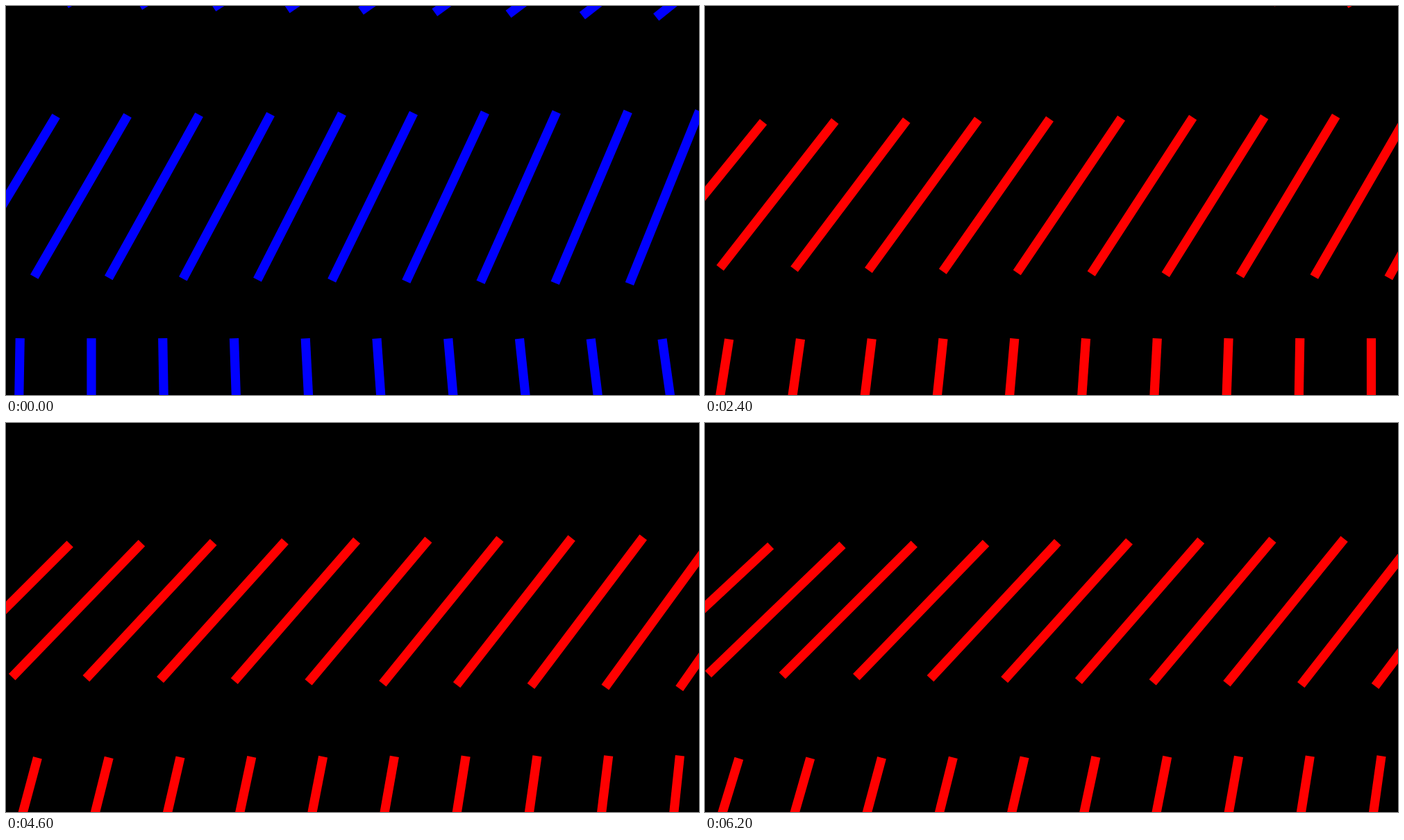
An HTML page that plays this animation: 998x561 px, repeating every 6300 ms.

```html
<!DOCTYPE html>
<html lang="en">
<head>
<meta charset="utf-8">
<title>Turning bars</title>
<style>
  html, body { margin: 0; width: 100%; height: 100%; overflow: hidden; background: #000; }
  svg { display: block; width: 100vw; height: 100vh; }
</style>
</head>
<body>
<svg id="stage" viewBox="0 0 998 561" preserveAspectRatio="none"></svg>
<script>
  const LOOP = 6300, STEP = 100;
  const BLUE = '#0000ff', RED = '#ff0000';
  const PITCH = 104.57, LEFT = 18.4;      // column pivots
  const ROW_PITCH = 335.4, TOP = -87.3;   // row pivots
  const ABOVE = 104.3, BELOW = 164.5, WIDTH = 13.2;
  const ROW_TURN = 30;                    // degrees between rows, 1 between columns

  const pauses = [30, 35, 40, 41];        // ticks on which nothing moves
  const turns = [[0, 59], [14, 152], [24, 231], [31, 291], [42, 405], [48, 480], [58, 583]];

  const bars = [];
  const stage = document.getElementById('stage');
  for (let row = 0; row < 3; row++) {
    for (let col = -1; col <= 10; col++) {
      const el = document.createElementNS('http://www.w3.org/2000/svg', 'rect');
      el.setAttribute('x', -WIDTH / 2);
      el.setAttribute('y', -ABOVE);
      el.setAttribute('width', WIDTH);
      el.setAttribute('height', ABOVE + BELOW);
      stage.appendChild(el);
      bars.push({ el, row, col, x: LEFT + col * PITCH, y: TOP + row * ROW_PITCH });
    }
  }

  function baseAngle(tick) {
    const n = tick - pauses.filter(p => p <= tick).length;
    let i = 0;
    while (i < turns.length - 2 && n > turns[i + 1][0]) i++;
    const [n0, a0] = turns[i], [n1, a1] = turns[i + 1];
    return Math.round(a0 + (a1 - a0) * (n - n0) / (n1 - n0));
  }

  function colour(tick, row) {
    if (tick < 19) return BLUE;
    if (tick < 28) return RED;
    return tick < (row === 2 ? 32 : 33) ? BLUE : RED;
  }

  function draw(ms) {
    const tick = Math.floor((ms % LOOP) / STEP);
    const base = baseAngle(tick);
    for (const { el, row, col, x, y } of bars) {
      const angle = (base + (row - 1) * ROW_TURN + col + 180) % 180;
      el.setAttribute('transform', `translate(${x} ${y}) rotate(${90 - angle})`);
      el.setAttribute('fill', colour(tick, row));
    }
  }

  const start = performance.now();
  function frame() {
    draw(performance.now() - start);
    requestAnimationFrame(frame);
  }
  frame();
</script>
</body>
</html>
```
